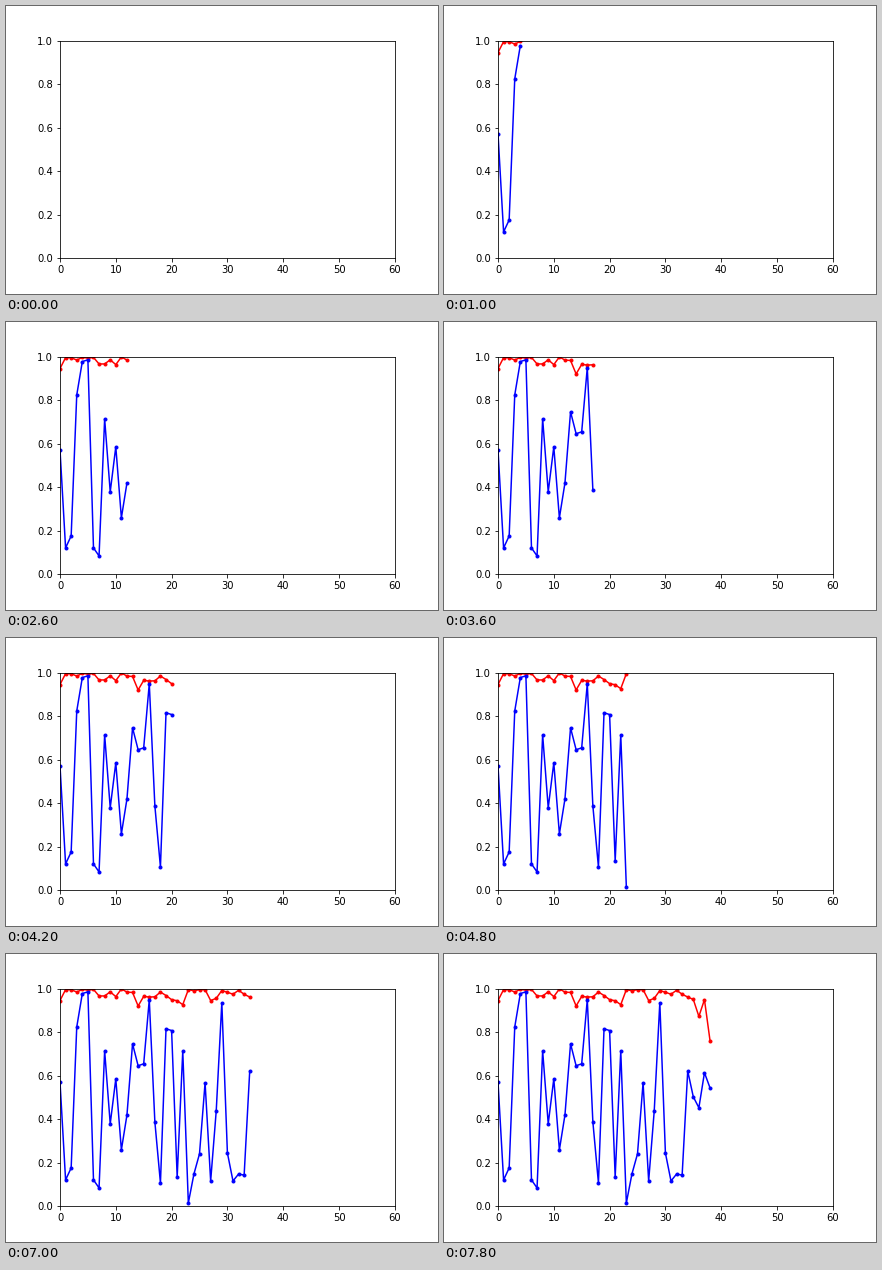
A matplotlib script that plays this animation: 432 px wide and 288 px high, repeating every 8 s.

```python
import numpy as np
import matplotlib.pyplot as plt
from matplotlib.animation import FuncAnimation

FRAMES = 40
INTERVAL = 200

red = np.array([
    .945, .995, .995, .984, .996, .993, .996, .966, .966, .985,
    .963, .998, .984, .982, .920, .964, .961, .962, .984, .968,
    .949, .944, .926, .995, .990, .995, .995, .945, .955, .991,
    .983, .974, .992, .974, .961, .950, .872, .949, .760])
blue = np.array([
    .571, .120, .175, .823, .977, .985, .120, .083, .714, .378,
    .585, .258, .419, .746, .645, .654, .949, .387, .106, .815,
    .807, .134, .713, .014, .147, .240, .567, .115, .438, .935,
    .244, .115, .147, .142, .621, .502, .452, .613, .543])

plt.rcParams.update({"font.family": "DejaVu Sans", "font.size": 10})

fig, ax = plt.subplots(figsize=(6, 4), dpi=72)
fig.subplots_adjust(left=0.125, right=0.9, bottom=0.125, top=0.88)
ax.set_xlim(0, 60)
ax.set_ylim(0, 1)

red_line, = ax.plot([], [], "r.-", lw=1.5, ms=6)
blue_line, = ax.plot([], [], "b.-", lw=1.5, ms=6)


def draw(count):
    """Show the first `count` samples of both series."""
    x = np.arange(count)
    red_line.set_data(x, red[:count])
    blue_line.set_data(x, blue[:count])
    return red_line, blue_line


def reset():
    return draw(0)


anim = FuncAnimation(fig, draw, frames=FRAMES, init_func=reset,
                     interval=INTERVAL, repeat=True, repeat_delay=0)
plt.show()
```
